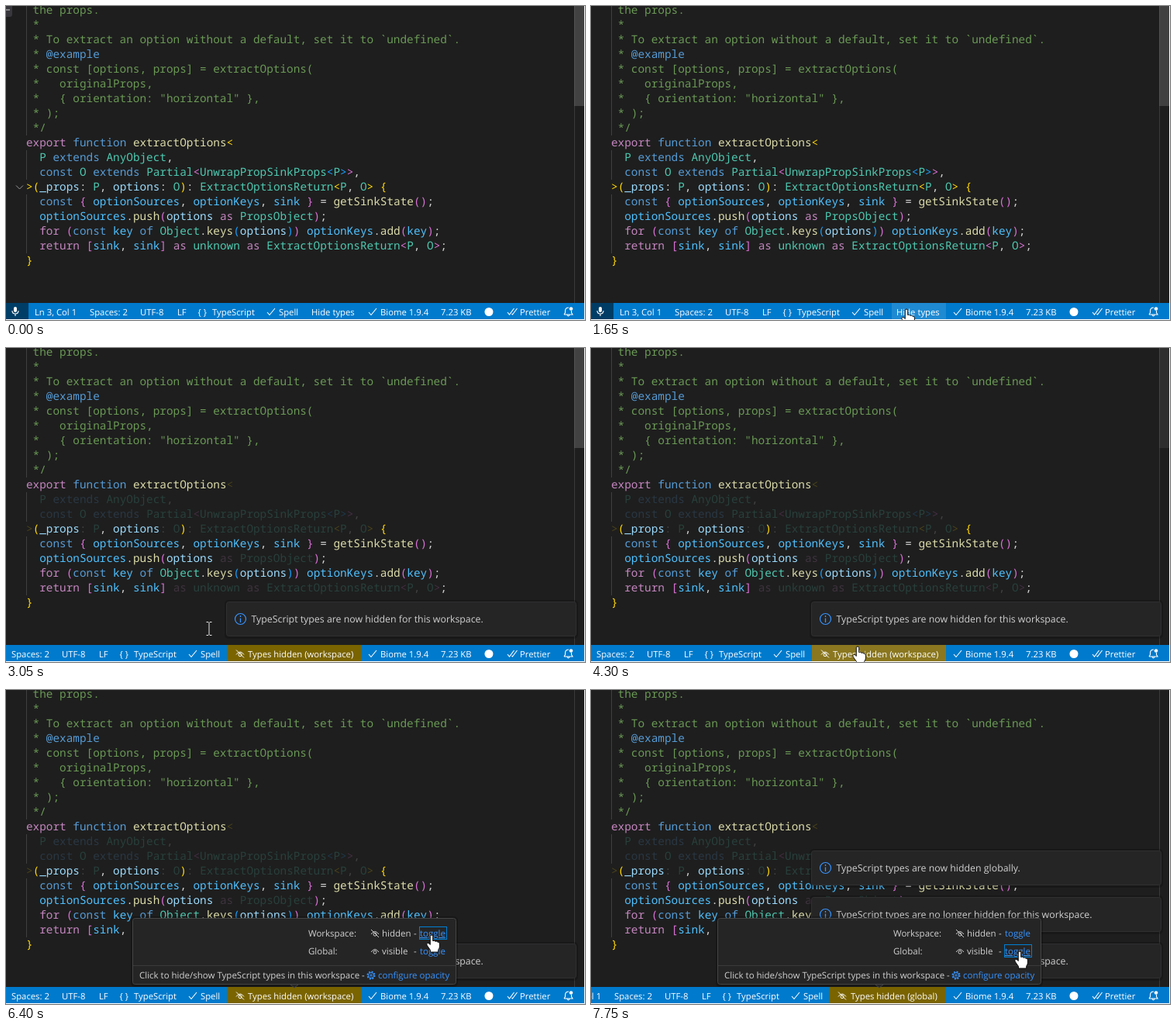
Recreate the animation shown at these times as an HTML page. Size 747 px wide and 405 px high, loop 8000 ms.

```html
<!DOCTYPE html>
<html lang="en">
<head>
<meta charset="utf-8">
<title>Hide types</title>
<style>
  html, body { margin: 0; width: 100%; height: 100%; overflow: hidden; background: #1e1e1e; }
  svg { display: block; width: 747px; height: 405px; }
  text { white-space: pre; font-family: "Open Sans", "Noto Sans", sans-serif; text-rendering: geometricPrecision; }
  #code text { font: 14.36px "Noto Sans Mono", "DejaVu Sans Mono", monospace; font-variant-ligatures: none; }
  #code.hide .type { fill-opacity: .2; }
  #bar text { font-size: 11.3px; fill: #fff; }
  #tip text { font-size: 11.5px; fill: #d0d0d0; }
  #tip .link { fill: #3794ff; }
  #tip .on .link { text-decoration: underline; }
  #tip .on rect { stroke: #007fd4; }
  .toast text { font-size: 12.35px; fill: #d0d0d0; }
  .line { fill: none; stroke: #fff; stroke-width: 1.1; }
</style>
</head>
<body>
<svg viewBox="0 0 747 405">
  <defs>
    <path id="tick" class="line" d="M-5 .5L-2 4 5-4.5" />
    <path id="eye" d="M-5 1Q0-6 5 1M-2 1.2a2 2 0 1 0 4 0a2 2 0 1 0-4 0" fill="none" />
    <path id="eyeOff" d="M-5 1Q0-6 5 1M-2 1.2a2 2 0 1 0 4 0a2 2 0 1 0-4 0M-5-5L5 5" fill="none" />
  </defs>

  <rect width="747" height="405" fill="#1e1e1e" />
  <path d="M26.5 0V167M26.5 186V224M26.5 243V319" stroke="#404040" />
  <g id="code"></g>
  <path id="fold" d="M13 231.5l4.5 4.5 4.5-4.5" fill="none" stroke="#9a9a9a" />
  <g id="minus">
    <rect x="-4" width="12" height="18" rx="3" fill="#37373d" />
    <path d="M0 9H5" stroke="#d0d0d0" />
  </g>
  <path d="M733.5 0V383" stroke="#7f7f7f" stroke-opacity=".3" />
  <rect id="slider" x="733" width="13" height="129" fill="#797979" fill-opacity=".4" />

  <g id="toasts"></g>

  <g id="bar">
    <rect y="383" width="747" height="22" fill="#007acc" />
    <g id="left">
      <rect y="383" width="29" height="22" fill="#003d66" />
      <rect x="10" y="388" width="4" height="7" rx="2" fill="#fff" />
      <path class="line" d="M8 393q0 4 4 4t4-4M12 397v3" />
      <text x="37" y="399">Ln 3, Col 1</text>
      <text x="108" y="399">Spaces: 2</text>
      <text x="173" y="399">UTF-8</text>
      <text x="221" y="399">LF</text>
      <text x="247.5" y="399">{ }</text>
      <text x="266" y="399">TypeScript</text>
      <use href="#tick" x="342" y="394.5" />
      <text x="352" y="399">Spell</text>
    </g>
    <g id="item">
      <rect id="itemBg" y="383" height="22" />
      <use id="itemEye" href="#eyeOff" y="394.5" stroke="#fff" />
      <text id="itemText" y="399"></text>
    </g>
    <use href="#tick" x="473" y="394.5" />
    <text x="483" y="399">Biome 1.9.4</text>
    <text x="561" y="399">7.23 KB</text>
    <circle cx="623" cy="394.5" r="5.5" fill="#fff" />
    <path class="line" d="M647 395l2.500 3 6-8M652.500 397l1 1 6-8" />
    <text x="663" y="399">Prettier</text>
    <path class="line" d="M720 398h11l-1.5-2.5v-2.500M726 389q-4.500 0-4.500 4.500v2l-1.500 2.500M724 398.500q1.500 3 3 0" />
    <circle cx="729" cy="390.5" r="2.3" fill="#fff" />
  </g>
  <path d="M746.5 0V404.5H0" fill="none" stroke="#fff" />

  <g id="tip">
    <rect x="161" y="292" width="422" height="91" rx="5" fill="#000" fill-opacity=".22" />
    <path d="M367 380l5 4 5-4" fill="#252526" stroke="#454545" />
    <rect x="163.500" y="294.500" width="417" height="85" rx="3" fill="#252526" stroke="#454545" />
    <path d="M164 355.500H580" stroke="#3a3a3b" />
    <text x="390" y="318">Workspace:</text>
    <use href="#eyeOff" x="476" y="314" stroke="#ccc" />
    <text x="485" y="318">hidden</text>
    <text x="526" y="318">-</text>
    <g id="linkA"><rect x="533.500" y="305.500" width="35" height="16" fill="none" /><text class="link" x="534" y="318">toggle</text></g>
    <text x="390" y="341">Global:</text>
    <use href="#eye" x="476" y="337" stroke="#ccc" />
    <text x="485" y="341">visible</text>
    <text x="526" y="341">-</text>
    <g id="linkB"><rect x="533.500" y="328.500" width="35" height="16" fill="none" /><text class="link" x="534" y="341">toggle</text></g>
    <text x="172" y="372">Click to hide/show TypeScript types in this workspace -</text>
    <g fill="none" stroke="#3794ff">
      <circle cx="471" cy="368" r="4.600" stroke-width="1.800" stroke-dasharray="2 1.610" />
      <circle cx="471" cy="368" r="3.500" />
      <circle cx="471" cy="368" r="1.200" />
    </g>
    <text class="link" x="480" y="372">configure opacity</text>
  </g>

  <g id="cursor">
    <path id="beam" d="M-3.500-8.500h2.500l1 1 1-1h2.500M0-7.500V7.500M-3.500 8.500h2.500l1-1 1 1h2.500" fill="none" stroke="#e8e8e8" />
    <path id="arrow" d="M0 0V16L3.700 12.500 6.200 18.300 8.600 17.300 6.200 11.600H11.300Z" fill="#fff" stroke="#000" stroke-width=".8" />
    <path id="hand" d="M-1.700 1.700a1.700 1.700 0 0 1 3.400 0V7.500q2-1 3.300.8 1.800-.7 2.900.8 2.300-.3 2.500 1.900V15q0 2-1.700 4.200V22H-1.500V19.500L-5.600 13.600q-1.300-2.300.3-3.100 1.700-.5 3.600 2Z" fill="#fff" stroke="#000" stroke-width=".9" />
  </g>
</svg>
<script>
const LOOP = 8000, STEP = 50;
const $ = id => document.getElementById(id);
const esc = s => s.replace(/&/g, '&amp;').replace(/</g, '&lt;');
const clamp = v => Math.min(1, Math.max(0, v));
const set = (el, attrs) => { for (const k in attrs) el.setAttribute(k, attrs[k]); };
const show = (id, on) => $(id).setAttribute('visibility', on ? 'visible' : 'hidden');

// Type-only spans are wrapped in « ».
const comments = ` the props.
 *
 * To extract an option without a default, set it to \`undefined\`.
 * @example
 * const [options, props] = extractOptions(
 *   originalProps,
 *   { orientation: "horizontal" },
 * );
 */`.split('\n');
const source = `export function extractOptions«<»
«  P extends AnyObject,»
«  const O extends Partial<UnwrapPropSinkProps<P>>,»
«>»(_props«: P», options«: O»)«: ExtractOptionsReturn<P, O>» {
  const { optionSources, optionKeys, sink } = getSinkState();
  optionSources.push(options« as PropsObject»);
  for (const key of Object.keys(options)) optionKeys.add(key);
  return [sink, sink]« as unknown as ExtractOptionsReturn<P, O>»;
}`.split('\n');

const wordColors = [
  [/^(export|return|for|as)$/, '#c586c0'],
  [/^(function|const|extends|of)$/, '#569cd6'],
  [/^([A-Z]\w*|unknown)$/, '#4ec9b0'],
  [/^(extractOptions|getSinkState|push|keys|add)$/, '#dcdcaa'],
  [/^(optionSources|optionKeys|sink|key)$/, '#4fc1ff'],
  [/./, '#9cdcfe']
];
const bracketColors = ['#ffd700', '#da70d6', '#179fff'];
let depth = 0, inType = false;

function colorOf(token) {
  if (/\w/.test(token)) return wordColors.find(([re]) => re.test(token))[1];
  if ('<([{'.includes(token)) return bracketColors[depth++ % 3];
  if ('>)]}'.includes(token)) return bracketColors[--depth % 3];
  return '#d4d4d4';
}
const span = (s, color, cls = '') => `<tspan fill="${color}" class="${cls}">${esc(s)}</tspan>`;
function codeLine(line) {
  return line.match(/\w+|\s+|./g).map(token => {
    if (token === '«' || token === '»') { inType = token === '«'; return ''; }
    const color = token.trim() ? colorOf(token) : '#d4d4d4';
    return span(token, color, inType ? 'type' : '');
  }).join('');
}
const commentLine = line => line.split(/(@example)/)
  .map(s => span(s, s === '@example' ? '#569cd6' : '#6a9955')).join('');

$('code').innerHTML = [...comments.map(commentLine), ...source.map(codeLine)]
  .map((line, i) => `<text x="26" y="${10 + 19 * i}">${line}</text>`).join('');

const toasts = [
  { start: 2050, y: 327, text: 'TypeScript types are now hidden for this workspace.' },
  { start: 6500, y: 267, text: 'TypeScript types are no longer hidden for this workspace.' },
  { start: 7450, y: 207, text: 'TypeScript types are now hidden globally.' }
];
$('toasts').innerHTML = toasts.map(({ y, text }, i) => `
  <clipPath id="clip${i}"><rect x="276" y="${y - 6}" width="468" height="58" /></clipPath>
  <g clip-path="url(#clip${i})"><g class="toast">
    <rect x="282" y="${y - 2}" width="456" height="50" rx="5" fill="#000" fill-opacity=".2" />
    <rect x="284.5" y="${y + .5}" width="451" height="44" rx="3" fill="#252526" stroke="#303031" />
    <circle cx="302.5" cy="${y + 22.5}" r="7" fill="none" stroke="#3794ff" stroke-width="1.2" />
    <path d="M302.5 ${y + 18}v2M302.5 ${y + 21.5}v5.5" stroke="#3794ff" stroke-width="1.3" />
    <text x="316.500" y="${y + 27}">${text}</text>
  </g></g>`).join('');
const toastEls = [...document.querySelectorAll('.toast')];

const statusStates = {
  shown: { shift: 0, x: 388, icon: -20, textX: 394, text: 'Hide types' },
  workspace: { shift: -101, x: 285, icon: 302, textX: 312, text: 'Types hidden (workspace)' },
  global: { shift: -78, x: 307, icon: 324, textX: 335, text: 'Types hidden (global)' }
};

// Pointer path: time, x, y, shape
const path = [
  [0, -12, -20, 'arrow'], [50, 2, 2, 'arrow'], [120, 28, 24, 'beam'], [450, 170, 125, 'beam'],
  [850, 312, 253, 'beam'], [950, 340, 281, 'beam'], [1150, 376, 352, 'beam'], [1250, 390, 384, 'hand'],
  [1700, 409, 392, 'hand'], [2450, 409, 392, 'hand'], [2500, 411, 393, 'hand'], [2550, 406, 392, 'hand'],
  [2700, 406, 392, 'hand'], [2850, 340, 378, 'beam'], [3050, 262, 362, 'beam'], [3250, 248, 386, 'hand'],
  [3350, 246, 418, 'hand'], [3900, 246, 418, 'hand'], [4100, 296, 395, 'hand'], [4300, 344, 385, 'hand'],
  [4550, 365, 391, 'hand'], [5050, 365, 391, 'hand'], [5150, 386, 378, 'arrow'], [5350, 430, 347, 'arrow'],
  [5600, 502, 327, 'arrow'], [5800, 546, 319, 'hand'], [5900, 553, 318, 'hand'], [5950, 549, 316, 'hand'],
  [6750, 549, 316, 'hand'], [6850, 554, 329, 'hand'], [7050, 553, 337, 'hand'], [LOOP, 553, 337, 'hand']
];
function pointerAt(t) {
  const i = path.findIndex(p => p[0] > t) - 1;
  const [t0, x0, y0, shape] = path[i], [t1, x1, y1] = path[i + 1];
  const k = (t - t0) / (t1 - t0);
  return { x: x0 + (x1 - x0) * k, y: y0 + (y1 - y0) * k, shape };
}

// CSS ease-out, cubic-bezier(0, 0, .58, 1)
function easeOut(x) {
  let lo = 0, hi = 1;
  for (let i = 0; i < 20; i++) {
    const s = (lo + hi) / 2;
    if (1.74 * s * s * (1 - s) + s ** 3 < x) lo = s; else hi = s;
  }
  return lo * lo * (3 - 2 * lo);
}

function sliderAlpha(t) {
  if (t < 2800) return 1 - clamp((t - 1600) / 800);
  return clamp((t - 2800) / 100) * (1 - clamp((t - 3850) / 800));
}

function draw(t) {
  const mode = t < 1950 ? 'shown' : t < 6450 ? 'workspace' : t < 7400 ? 'shown' : 'global';
  const hidden = mode !== 'shown';
  const p = pointerAt(t);

  $('code').classList.toggle('hide', hidden);
  $('fold').setAttribute('opacity', 1 - clamp((t - 150) / 500));
  $('slider').setAttribute('opacity', sliderAlpha(t));

  show('minus', t < 1250);
  const row = Math.max(0, Math.min(17, Math.floor((p.y + 4.500) / 19)));
  set($('minus'), { transform: `translate(0 ${row * 19 - 4})` });

  const s = statusStates[mode];
  const hover = p.y > 383 && p.y < 405 && p.x > s.x && p.x < 458;
  set($('left'), { transform: `translate(${s.shift} 0)` });
  set($('itemBg'), {
    x: s.x, width: 458 - s.x,
    fill: hidden ? (hover ? '#8a771f' : '#7a6400') : (hover ? '#1f8ad2' : '#007acc')
  });
  set($('itemEye'), { x: s.icon });
  set($('itemText'), { x: s.textX });
  $('itemText').textContent = s.text;

  toasts.forEach(({ start }, i) => {
    const k = easeOut(clamp((t - start) / 300));
    set(toastEls[i], { transform: `translate(0 ${45 * (1 - k)})`, opacity: k });
  });

  $('tip').setAttribute('opacity', clamp((t - 4800) / 150));
  $('linkA').classList.toggle('on', t >= 6400 && t < 7350);
  $('linkB').classList.toggle('on', t >= 7350);

  set($('cursor'), { transform: `translate(${Math.round(p.x)} ${Math.round(p.y)})` });
  for (const id of ['beam', 'arrow', 'hand']) show(id, id === p.shape);
}

const began = performance.now();
function tick() {
  const t = (performance.now() - began) % LOOP;
  draw(Math.floor(t / STEP) * STEP);
  requestAnimationFrame(tick);
}
tick();
</script>
</body>
</html>
```
